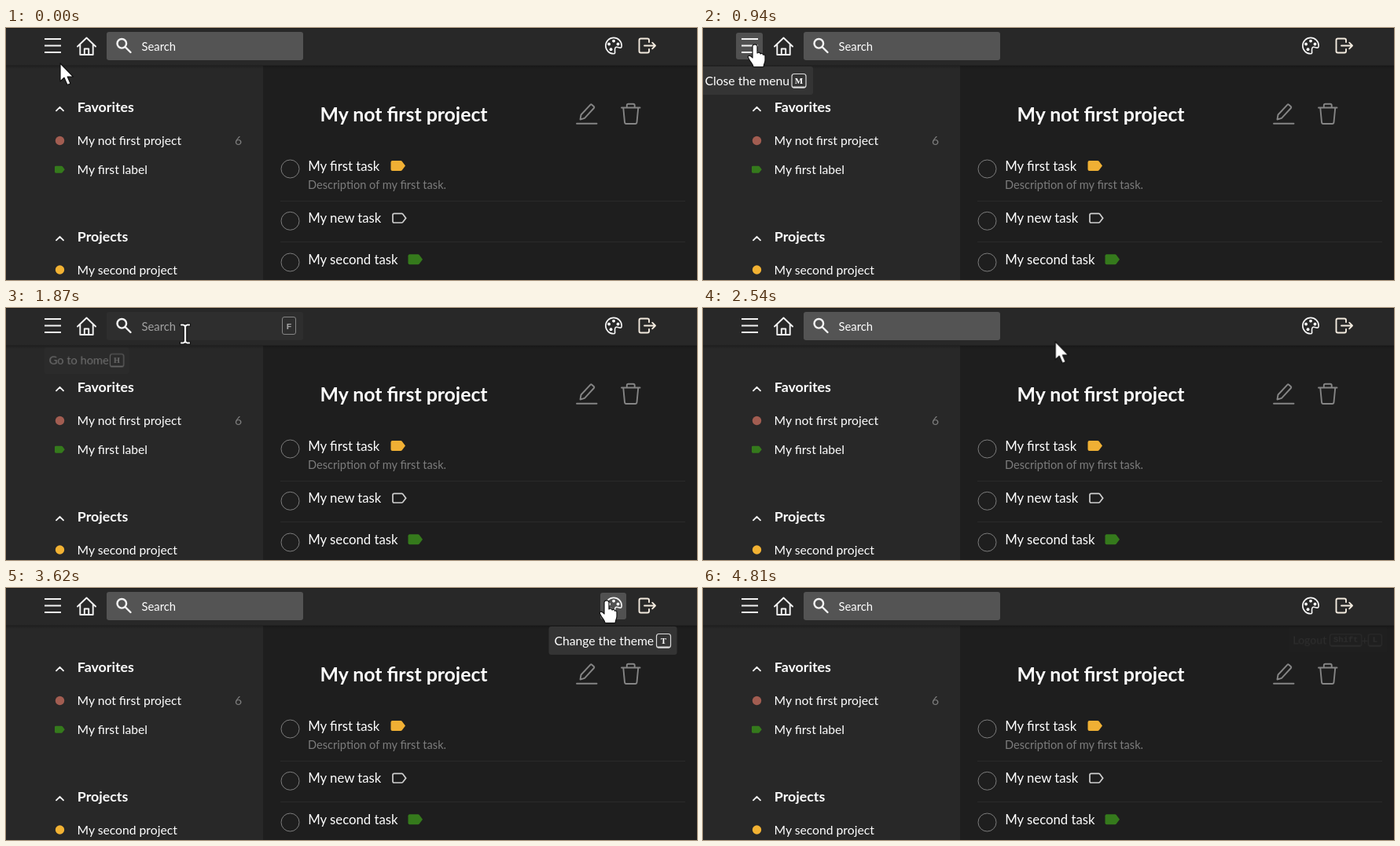
Recreate the animation shown at these times as an HTML page. Size 879x321 px, loop 4.95 s.

```html
<!DOCTYPE html>
<html lang="en">
<head>
<meta charset="utf-8">
<title>Task list shortcuts</title>
<style>
html, body { margin: 0; width: 100%; height: 100%; overflow: hidden; background: #1e1e1e; }
svg { display: block; width: 879px; height: 321px; font: 15.7px Lato, sans-serif; fill: #fff; }
.bold { font-weight: 700; font-size: 17.8px; }
.title { font-weight: 700; font-size: 24.8px; }
.task { font-size: 16.75px; }
.line { fill: none; stroke: #f4f4f4; stroke-width: 1.9; stroke-linejoin: round; stroke-linecap: round; }
.gray { stroke: #858585; }
.ring { fill: none; stroke: #7c7c7c; }
.rule { fill: #2a2a2a; }
.hover { fill: #515151; }
.tip > rect:first-child { fill: #343434; }
.key { fill: none; stroke: #dcdcdc; stroke-width: 1.2; }
.foot { stroke: #dcdcdc; stroke-width: 1.8; stroke-linecap: round; }
.cap { font: 700 11px "Liberation Serif", serif; text-anchor: middle; }
.mono { font: 700 11.7px "Liberation Mono", monospace; text-anchor: middle; }
.shape { fill: #fff; stroke: #111; stroke-width: 1.2; stroke-linejoin: round; }

/* 74 ticks per loop: one tick is 1.35135% */
.hover, .tip, .shape, .box, .hint, .f-key, .cursor { animation: 4950ms -6ms step-end infinite; }
.hover, .tip, .shape, .f-key { opacity: 0; }
.cursor { animation-name: move; }
.arrow { animation-name: arrow; }
.hand { animation-name: hand; }
.beam { animation-name: beam; }
.box { fill: #545454; animation-name: box; }
.hint { font-size: 14.8px; animation-name: hint; }
.f-key { animation-name: f-key; }
.h-menu { animation-name: h-menu; }
.h-home { animation-name: h-home; }
.h-theme { animation-name: h-theme; }
.h-exit { animation-name: h-exit; }
.t-menu { animation-name: t-menu; transform-origin: 68px 67px; }
.t-home { animation-name: t-home; transform-origin: 102.5px 67px; }
.t-theme { animation-name: t-theme; transform-origin: 772px 67px; }
.t-exit { animation-name: t-exit; transform-origin: 807.5px 66px; }

@keyframes move {
  0% { transform: translate(69px, 45px); animation-timing-function: steps(4); }
  5.405% { transform: translate(63px, 21px); }
  17.568% { transform: translate(63px, 21px); }
  18.919% { transform: translate(66px, 21px); animation-timing-function: steps(4); }
  24.324% { transform: translate(103px, 24px); }
  33.784% { transform: translate(103px, 24px); animation-timing-function: steps(3); }
  37.838% { transform: translate(228px, 33px); animation-timing-function: steps(2); }
  40.541% { transform: translate(265px, 30px); }
  47.297% { transform: translate(278px, 32px); animation-timing-function: steps(2); }
  50% { transform: translate(392px, 43px); animation-timing-function: steps(5); }
  56.757% { transform: translate(673px, 42px); }
  58.108% { transform: translate(714px, 37px); animation-timing-function: steps(2); }
  60.811% { transform: translate(757px, 22px); animation-timing-function: steps(3); }
  64.865% { transform: translate(764px, 16px); }
  77.027% { transform: translate(764px, 16px); animation-timing-function: steps(3); }
  81.081% { transform: translate(814px, 22px); animation-timing-function: steps(2); }
  83.784% { transform: translate(822px, 22px); }
  93.243% { transform: translate(822px, 22px); animation-timing-function: steps(2); }
  95.946%, 100% { transform: translate(864px, 36px); }
}
@keyframes arrow {
  0%, 50%, 94.595% { opacity: 1; }
  2.703%, 60.811%, 97.297%, 100% { opacity: 0; }
}
@keyframes hand {
  0%, 35.135%, 94.595%, 100% { opacity: 0; }
  2.703%, 60.811% { opacity: 1; }
}
@keyframes beam {
  0%, 50%, 100% { opacity: 0; }
  35.135% { opacity: 1; }
}
@keyframes box {
  0%, 50%, 100% { fill: #545454; }
  35.135% { fill: #2e2e2e; }
}
@keyframes hint {
  0%, 50%, 100% { fill: #fff; }
  35.135% { fill: #a2a2a2; }
}
@keyframes f-key {
  0%, 50%, 100% { opacity: 0; }
  35.135% { opacity: 1; }
}
@keyframes h-menu {
  0%, 21.622%, 100% { opacity: 0; }
  2.703% { opacity: 1; }
}
@keyframes h-home {
  0%, 35.135%, 100% { opacity: 0; }
  21.622% { opacity: 1; }
}
@keyframes h-theme {
  0%, 79.73%, 100% { opacity: 0; }
  60.811% { opacity: 1; }
}
@keyframes h-exit {
  0%, 94.595%, 100% { opacity: 0; }
  79.73% { opacity: 1; }
}
@keyframes t-menu {
  0% { opacity: 0; transform: none; }
  5.405% { opacity: 0; transform: none; animation-timing-function: steps(5); }
  12.162% { opacity: 1; transform: none; }
  18.919% { opacity: 1; transform: scale(1); animation-timing-function: steps(4); }
  24.324%, 100% { opacity: 0; transform: scale(.9); }
}
@keyframes t-home {
  0% { opacity: 0; transform: none; }
  28.378% { opacity: 0; transform: none; animation-timing-function: steps(3); }
  32.432% { opacity: 1; transform: none; }
  35.135% { opacity: 1; transform: scale(1); animation-timing-function: steps(3); }
  39.189%, 100% { opacity: 0; transform: scale(.9); }
}
@keyframes t-theme {
  0% { opacity: 0; transform: none; }
  67.568% { opacity: 0; transform: none; animation-timing-function: steps(4); }
  72.973% { opacity: 1; transform: none; }
  79.73% { opacity: 1; transform: scale(1); animation-timing-function: steps(3); }
  83.784%, 100% { opacity: 0; transform: scale(.9); }
}
@keyframes t-exit {
  0% { opacity: 0; transform: none; }
  86.486% { opacity: 0; transform: none; animation-timing-function: steps(3); }
  90.541% { opacity: 1; transform: none; }
  93.243% { opacity: 1; transform: scale(1); animation-timing-function: steps(3); }
  97.297%, 100% { opacity: .07; transform: scale(.9); }
}
</style>
</head>
<body>
<svg viewBox="0 0 879 321">
  <defs>
    <linearGradient id="shade" x2="0" y2="1">
      <stop stop-opacity=".22"/>
      <stop offset="1" stop-opacity="0"/>
    </linearGradient>
    <path id="tag" d="M2 0H12.5Q13.5 0 14.2 .8L18.5 6.5L14.2 12.2Q13.5 13 12.5 13H2Q0 13 0 11V2Q0 0 2 0Z"/>
    <path id="chevron" class="line" d="M64 5.5L68.5 1L73 5.5"/>
  </defs>

  <!-- Panels -->
  <rect width="879" height="321" fill="#1e1e1e"/>
  <rect width="327" height="321" fill="#282828"/>
  <rect y="48" width="879" height="4" fill="url(#shade)"/>
  <rect width="879" height="48" fill="#282828"/>
  <rect width="879" height="1" fill="#1c1c1c"/>
  <rect y="47" width="879" height="1" fill="#222"/>

  <!-- Header -->
  <rect class="hover h-menu" x="42" y="6" width="34" height="34" rx="3"/>
  <rect class="hover h-home" x="86" y="6" width="33" height="34" rx="3"/>
  <rect class="hover h-theme" x="756" y="6" width="33" height="34" rx="3"/>
  <rect class="hover h-exit" x="798" y="6" width="34" height="34" rx="3"/>
  <path class="line" style="stroke-linecap:butt" d="M49 14H70M49 22.5H70M49 31H70"/>
  <path class="line" d="M91 23.5L102.5 12.5L114 23.5M94.3 21V34H110.7V21M99.8 34V26.5H105.2V34"/>
  <rect class="box" x="128" y="5" width="250" height="36" rx="3"/>
  <g class="line" style="stroke-width:2.4">
    <circle cx="147.3" cy="19.8" r="5.8"/>
    <path d="M152 24.5L158.5 31"/>
  </g>
  <text class="hint" x="172.5" y="28.5">Search</text>
  <g class="f-key">
    <rect x="351.5" y="11.5" width="17" height="22" rx="2.5" fill="none" stroke="#858585"/>
    <text class="mono" x="360" y="27" fill="#a2a2a2">F</text>
  </g>
  <g transform="translate(762 11.6) scale(1.375)">
    <path class="line" style="stroke-width:1.2" d="M15.4 8C15.4 10.5 14 10.1 12.5 9.6C11.4 9.2 10.2 9 9.6 9.7C9 10.4 9 11.5 9.1 12.9C9.3 14.4 9.4 15.4 8 15.4A7.4 7.4 0 1 1 15.4 8Z"/>
    <circle cx="8" cy="3.6" r="1.4"/>
    <circle cx="12" cy="6.5" r="1.4"/>
    <circle cx="3.7" cy="6.5" r="1.4"/>
    <circle cx="5.5" cy="11.4" r="1.4"/>
  </g>
  <path class="line" style="stroke:#f3ebdf" d="M818 18V15.5Q818 13.5 816 13.5H807.5Q805.5 13.5 805.5 15.5V29.5Q805.5 31.5 807.5 31.5H816Q818 31.5 818 29.5V27M812 22.5H826M822.2 18.7L826 22.5L822.2 26.3"/>

  <!-- Sidebar -->
  <use href="#chevron" y="99.8"/>
  <text class="bold" x="90.8" y="106.5">Favorites</text>
  <circle cx="68.5" cy="143.5" r="5.7" fill="#a25d51"/>
  <text x="90.6" y="149">My not first project</text>
  <text x="291" y="149" fill="#7c7c7c">6</text>
  <use href="#tag" transform="translate(62 175.7) scale(.69)" fill="#357a1c"/>
  <text x="90.6" y="186">My first label</text>
  <use href="#chevron" y="264.8"/>
  <text class="bold" x="90.8" y="271.5">Projects</text>
  <circle cx="68.5" cy="308" r="5.7" fill="#f2b233"/>
  <text x="90.6" y="314">My second project</text>

  <!-- Tasks -->
  <text class="title" x="399.5" y="118.5">My not first project</text>
  <path class="line gray" d="M726 121.7H751.5M730.5 116.5L731.5 110.5L743.3 97.8Q744.2 96.8 745.2 97.7L747.8 100Q748.8 101 747.9 102L736 114.8Z"/>
  <path class="line gray" d="M783 101.5H806.5M789.8 101V98.5Q789.8 96.8 791.5 96.8H798Q799.7 96.8 799.7 98.5V101M785.3 102L787 120Q787.2 122 789 122H800.5Q802.3 122 802.5 120L804.2 102"/>
  <circle class="ring" cx="361.5" cy="179.5" r="11.5"/>
  <text class="task" x="384.2" y="181.5">My first task</text>
  <use href="#tag" x="489.5" y="169" fill="#f0b034"/>
  <text x="384" y="205" font-size="14.6" fill="#7c7c7c">Description of my first task.</text>
  <rect class="rule" x="349" y="220" width="515" height="1"/>
  <circle class="ring" cx="361.5" cy="245.8" r="11.5"/>
  <text class="task" x="384.2" y="248">My new task</text>
  <use href="#tag" transform="translate(492 236.3) scale(.9)" fill="none" stroke="#d0d0d0" stroke-width="1.9"/>
  <rect class="rule" x="349" y="272" width="515" height="1"/>
  <circle class="ring" cx="361.5" cy="298.5" r="11.5"/>
  <text class="task" x="384.2" y="301">My second task</text>
  <use href="#tag" x="511.5" y="288.3" fill="#357a1c"/>

  <!-- Tooltips -->
  <g class="tip t-menu">
    <rect x="-4" y="49" width="144" height="36" rx="3"/>
    <text x="2.5" y="73">Close the menu</text>
    <rect class="key" x="113" y="58.5" width="18" height="17.5" rx="3"/>
    <path class="foot" d="M115 75.5H129"/>
    <text class="cap" x="122" y="70.5">M</text>
  </g>
  <g class="tip t-home">
    <rect x="44.5" y="49" width="116" height="36" rx="3"/>
    <text x="51.2" y="72">Go to home</text>
    <rect class="key" x="134.5" y="58" width="18.5" height="17.5" rx="3"/>
    <path class="foot" d="M136.5 75H151"/>
    <text class="cap" x="143.8" y="70">H</text>
  </g>
  <g class="tip t-theme">
    <rect x="690.5" y="49" width="163" height="36" rx="3"/>
    <text x="697.5" y="73">Change the theme</text>
    <rect class="key" x="827.5" y="58.5" width="18" height="17.5" rx="3"/>
    <path class="foot" d="M829.5 75.5H843.5"/>
    <text class="cap" x="836.5" y="70.5">T</text>
  </g>
  <g class="tip t-exit">
    <rect x="737.5" y="48" width="140" height="36" rx="3"/>
    <text x="744" y="72">Logout</text>
    <rect class="key" x="796.5" y="58" width="44.5" height="17" rx="3"/>
    <path class="foot" d="M798.5 74.5H839"/>
    <text class="mono" x="818.7" y="69.3">Shift</text>
    <text x="841" y="72">+</text>
    <rect class="key" x="850.5" y="58" width="19" height="17" rx="3"/>
    <path class="foot" d="M852.5 74.5H867.5"/>
    <text class="mono" x="860" y="69.3">L</text>
  </g>

  <g class="cursor">
    <path class="shape arrow" d="M0 0V23L5 18.3L9 27.5L13 25.8L9.2 17H16.5Z"/>
    <path class="shape hand" d="M-3 2.5C-3 -1 3 -1 3 2.5V11C4 9.5 7 9.8 7 12C8 11 10.5 11.3 10.5 13.2C11.5 12.5 13 13 13 15V20C13 24 11 25 11 28.5H-2C-2 26 -5 23 -7 19.5C-8.5 17 -9.8 15.5 -8.2 14.4C-6.5 13.3 -4.5 15 -3 17Z"/>
    <path class="shape beam" d="M-6.5 -13H-2L0 -12L2 -13H6.5V-9.8H2.5L1.8 -9V9L2.5 9.8H6.5V13H2L0 12L-2 13H-6.5V9.8H-2.5L-1.8 9V-9L-2.5 -9.8H-6.5Z"/>
  </g>
</svg>
</body>
</html>
```
